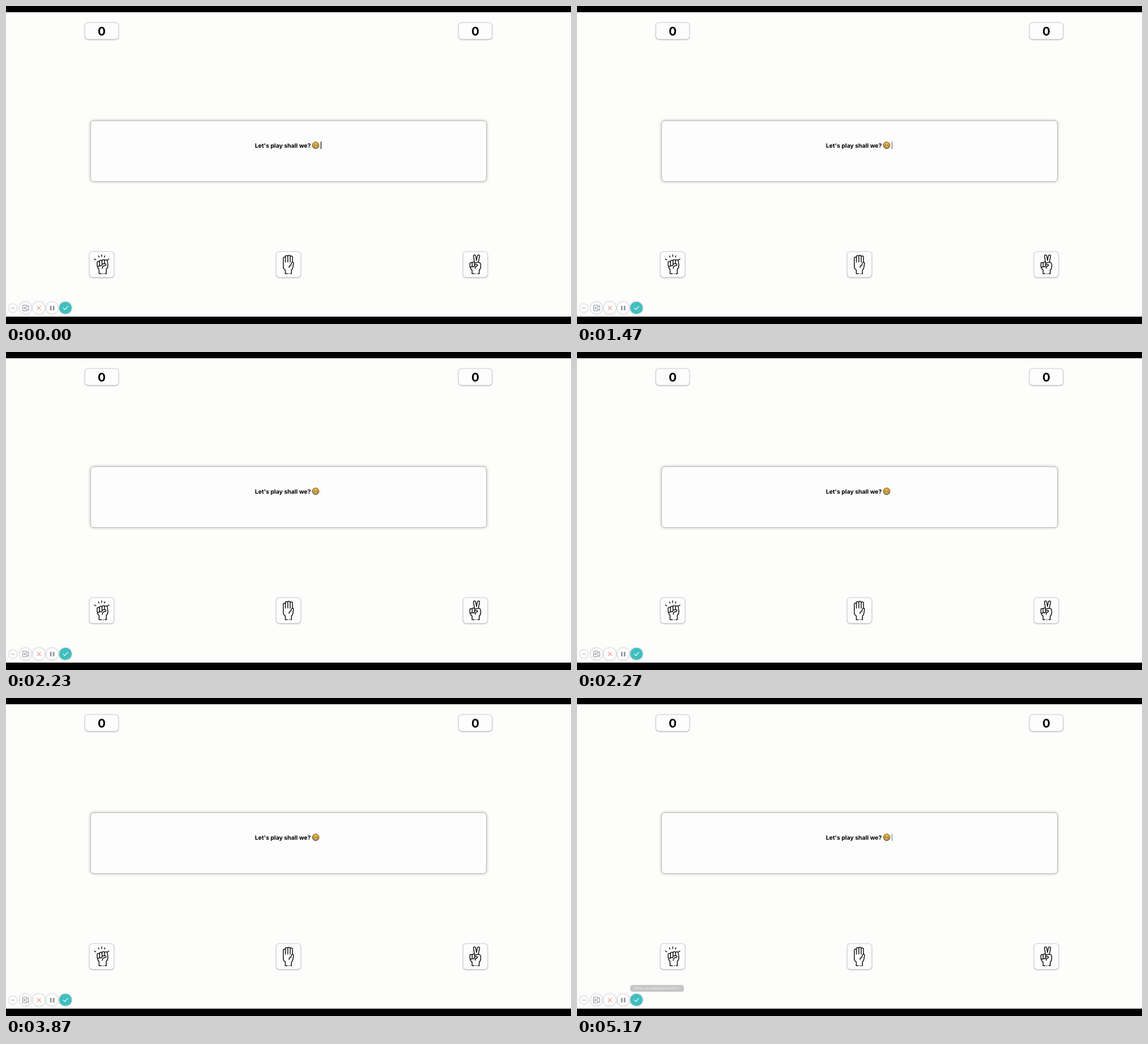
An HTML page that plays this animation: 998x561 px, repeating every 5.21 s.

```html
<!DOCTYPE html>
<html lang="en">
<head>
<meta charset="utf-8">
<title>Rock paper scissors</title>
<style>
  html, body { margin: 0; width: 100%; height: 100%; overflow: hidden; background: #fdfdfc; }
  #stage { position: absolute; left: 0; top: 0; width: 998px; height: 561px; overflow: hidden; }
  .bar { position: absolute; left: 0; width: 100%; background: #000; }
  .box { position: absolute; box-sizing: border-box; background: #fdfdfd; border-radius: 6px;
         border: 1px solid #d8d8e2; box-shadow: 0 .6px 2px rgba(0, 0, 0, .4); }
  .panel { border-color: #c0c0b8; box-shadow: 0 0 5px rgba(0, 0, 0, .3); }
  .round { position: absolute; border-radius: 50%; background: #fefefe;
           box-shadow: 0 0 3px rgba(40, 40, 70, .42); }
  svg { position: absolute; left: 0; top: 0; }
  text { font-family: Inter, Roboto, sans-serif; font-weight: 700; text-rendering: geometricPrecision; }
  .line { fill: none; stroke-linecap: round; stroke-linejoin: round; }
  .hand { stroke: #151515; stroke-width: 1.5; }
</style>
</head>
<body>
<div id="stage">
  <div class="bar" style="top:0;height:11px"></div>
  <div class="bar" style="top:548px;height:13px"></div>
  <svg width="998" height="561" viewBox="0 0 998 561">
    <g text-anchor="middle" font-size="20.8">
      <text x="169" y="51.7">0</text>
      <text x="829" y="51.7">0</text>
    </g>

    <text x="439.7" y="249.6" font-size="10.4">Let's play shall we?</text>
    <g>
      <circle cx="547" cy="245.8" r="5.9" fill="#fdbc30" stroke="#3a2f1a" stroke-width=".9"/>
      <path class="line" d="M543.2 244.2q1.2-1.7 2.4 0M548.4 244.2q1.2-1.7 2.4 0" stroke="#3a2f1a" stroke-width=".8"/>
      <path d="M543.1 246.5h7.8q-.5 3.6-3.9 3.6t-3.9-3.6z" fill="#f6f1e6" stroke="#3a2f1a" stroke-width=".7"/>
      <path d="M543.5 248.2h7" stroke="#3a2f1a" stroke-width=".5"/>
    </g>
    <rect id="caret" x="555.8" y="239.4" width="1.3" height="12.8" fill="#111"/>

    <!-- rock -->
    <g class="line hand">
      <path d="M169 439v3M163.3 440.8l1 2M174.7 440.8l-1 2M156.2 446.4l2.4 1.4M181.8 446.4l-2.4 1.4"/>
      <path d="M161 457.5v-5q0-2 2.1-2t2.1 2v5q0 2-2.1 2t-2.1-2z"/>
      <path d="M165.2 452v-1.6q0-2 2.2-2t2.2 2v6q0 1.9-2.2 1.9t-2.2-1.6"/>
      <path d="M169.6 450.6v-1.2q0-2 2.3-2t2.3 2v5.2M174.2 449.8q0-2 2.4-2 2.2 0 2.4 2.2l.9 7.2q.3 4.2-2.7 7.4v7.7h-2.4"/>
      <path d="M169.6 455.3q2.4-1 5-.7 2.6.5 1.8 2.5-.4.8-2.4.9-3.6.6-4 5M161.6 459q.1 3.6 2.8 5.8v7.5h4.2M171.6 472.3h.2"/>
    </g>

    <!-- paper -->
    <g class="line hand">
      <path d="M489.8 456v-11q0-1.9 1.9-1.9t1.9 1.9v7M493.6 445.2v-3q0-1.9 2.1-1.9t2.1 1.9v9.6M497.8 441.7q0-1.9 2.1-1.9t2.1 1.9v10.1M502 443q0-1.9 2-1.9t2 1.9v9"/>
      <path d="M489.8 456v4.2q0 3.2 3.6 5.6v6.5h3.6M500 472.3h.2M502.8 472.3h1.4v-6.4q2.2-1.8 2.6-5l1-6.8q.2-2-1.8-2.1-1.8.2-2.2 2.4l-.5 2.6q-3 .8-3.4 4.2"/>
    </g>

    <!-- scissors -->
    <g class="line hand">
      <path d="M827.5 451.6l-1.7-10q-.2-2 1.6-2.3 1.9-.2 2.3 1.8l1.3 7.8 1.7-8q.5-1.9 2.3-1.6 1.9.5 1.5 2.4l-2.2 10.6"/>
      <path d="M819.4 459v-4.6q0-2 2-2t2 2v4.4q0 1.9-2 1.9t-2-1.7zM823.4 453.6q.2-2 2.2-2t2.2 2v4.6q0 1.9-2.2 1.9t-2.2-1.7"/>
      <path d="M827.8 454q3-2 7-1.7 3.6.5 3.7 4v3.2q0 4.2-2.6 6.4v6.4h-2.6M830 472.3h.2M827.8 456.6q3-1 4.6-.2 1.4 1.2-.6 2.1-3 .8-3 4.2M819.8 460q.2 3.6 3.5 5.9v6.4h3.6"/>
    </g>

    <!-- recorder controls -->
    <g fill="#8d9097">
      <circle cx="9.7" cy="533" r=".8"/><circle cx="12" cy="533" r=".8"/><circle cx="14.3" cy="533" r=".8"/>
      <rect x="77.8" y="529" width="2.6" height="8"/>
      <rect x="82.8" y="529" width="2.6" height="8"/>
    </g>
    <g class="line" stroke="#858b94" stroke-width="1">
      <path d="M36.6 530.6v-2.8h-7v10h7v-2.8M36.6 531.6l3.4-3v8.8l-3.4-3M33.2 530.8v4M31.2 532.8h4"/>
      <path d="M54.9 529.6l6.4 6.4M61.3 529.6l-6.4 6.4" stroke="#ef9c8c" stroke-width="1.2"/>
    </g>
    <path class="line" d="M101.3 532.8l2.7 2.8 5.1-5.7" stroke="#fff" stroke-width="1.2"/>
    <g id="tip">
      <rect x="94" y="506.3" width="95" height="12" rx="4.5" fill="#c6c6c6"/>
      <text x="141.5" y="514.3" text-anchor="middle" font-size="5.7" style="font-weight:400" fill="#f5f5f5">Finish recording (Alt+Shift+F)</text>
    </g>
  </svg>
</div>
<script>
  const LOOP = 5210;
  const stage = document.getElementById('stage');
  const art = stage.querySelector('svg');

  function place(kind, x, y, w, h, fill) {
    const el = document.createElement('div');
    el.className = kind;
    Object.assign(el.style, { left: x + 'px', top: y + 'px', width: w + 'px', height: h + 'px' });
    if (fill) el.style.background = fill;
    stage.insertBefore(el, art);
  }

  for (const x of [139, 799]) place('box', x, 29, 60, 30);
  for (const x of [147, 477, 807]) place('box', x, 433, 44, 46);
  place('box panel', 149, 202, 700, 108);

  place('round', 5, 526, 14, 14);
  for (const x of [34.5, 58, 81.6]) place('round', x - 10.7, 522, 21.4, 21.4);
  place('round', 94.3, 522, 21.4, 21.4, '#40bfbf');

  // steps: [time in ms, opacity, easing towards the next step]
  function loop(id, steps) {
    const frames = steps.map(([t, opacity, easing = 'linear']) => ({ offset: t / LOOP, opacity, easing }));
    document.getElementById(id).animate(frames, { duration: LOOP, iterations: Infinity });
  }

  loop('caret', [
    [0, 1], [230, 1, 'ease'],
    [350, 0, 'ease'],
    [730, 1], [770, 1, 'ease'],
    [1270, 0], [1300, 0, 'ease'],
    [1800, 1], [1870, 1, 'ease'],
    [2370, 0], [2400, 0, 'ease'],
    [3130, 1], [3270, 1, 'ease'],
    [3700, 0], [3870, 0, 'ease'],
    [4300, 1], [4430, 1, 'ease'],
    [4930, 0], [4970, 0, 'ease'],
    [5170, .45], [LOOP, .45]
  ]);
  loop('tip', [[0, 0], [5070, 0], [5170, 1], [LOOP, 1]]);
</script>
</body>
</html>
```
